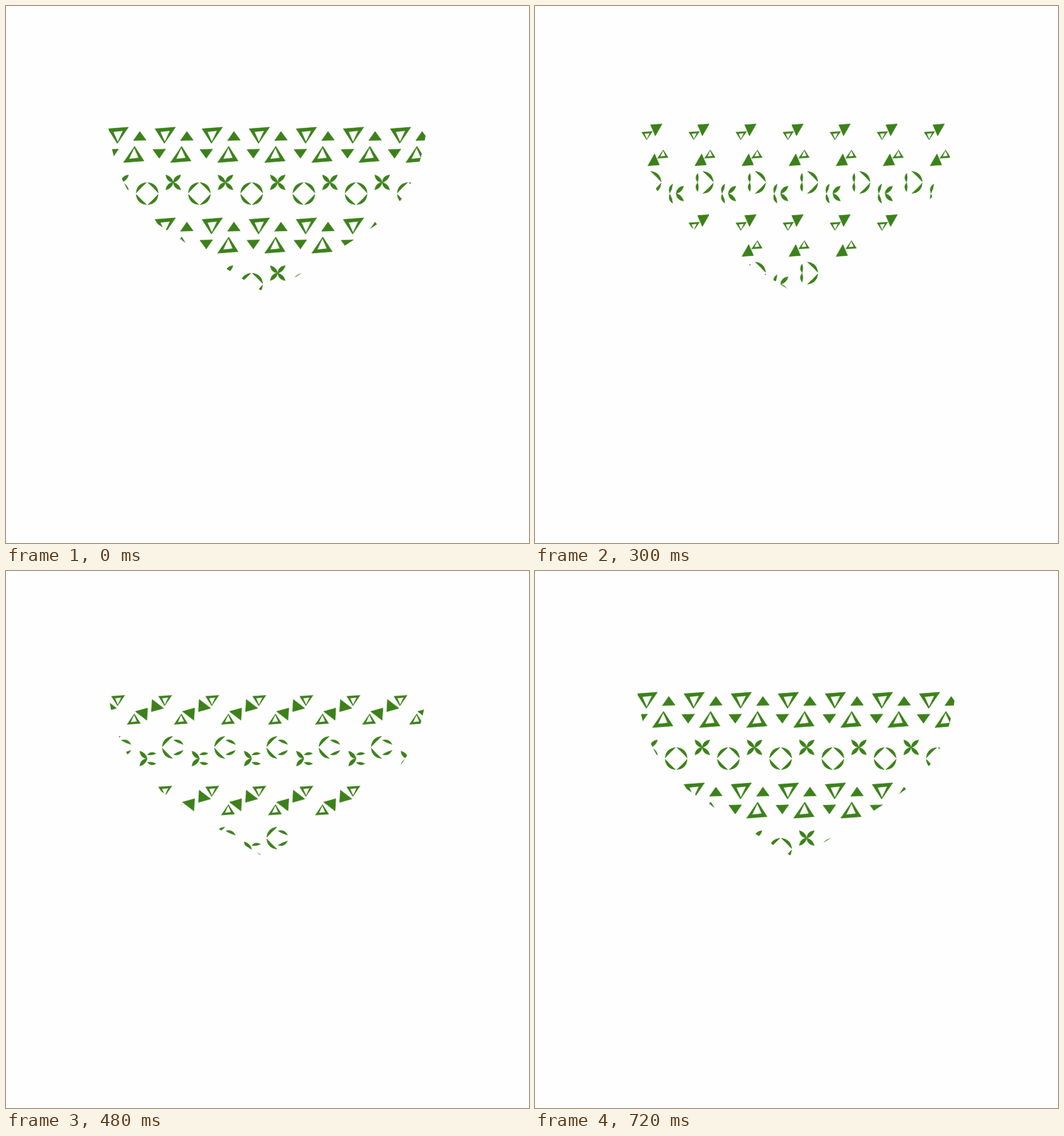
An HTML page with a canvas for the animation above (0.75 s loop, 739 by 758 pixels).

```html
<!DOCTYPE html>
<html>
<head>
<meta charset="utf-8">
<style>
html, body { margin: 0; width: 100%; height: 100%; overflow: hidden; background: #fefefe; }
canvas { display: block; }
</style>
</head>
<body>
<canvas width="739" height="758"></canvas>
<script>
const ctx = document.querySelector('canvas').getContext('2d');
const CENTER = 369.5, LOOP = 750, STEP = 30;

// Bowl: two curves down the left side, mirrored for the right.
const half = new Path2D('M143.5 160 Q151 255 209 304 Q262 341 369.5 407 V160 Z');
const bowl = new Path2D(half);
bowl.addPath(half, new DOMMatrix([-1, 0, 0, 1, 2 * CENTER, 0]));

// Triangles, relative to the middle of their tile.
const solid = polygon([[10.5, -6], [19.5, -19], [28.5, -6.7]]);
const pivot = [-11.2, -12.5];
const corners = [[-14.3, -10.2], [14.7, -12.4], [-1, 10.5]];
const outline = polygon(corners);
outline.addPath(polygon(corners.map(([x, y]) => [x * .48, y * .7 + 1.1])));

function polygon(points) {
  const path = new Path2D();
  points.forEach(([x, y]) => path.lineTo(x, y));
  path.closePath();
  return path;
}

const ramp = (t, from, to) => Math.min(1, Math.max(0, (t - from) / (to - from)));
const smooth = x => x * x * (3 - 2 * x);
const sharp = x => x * x / (x * x + (1 - x) * (1 - x));
const pulse = (t, from, peak, to) => smooth(t < peak ? ramp(t, from, peak) : 1 - ramp(t, peak, to));

function at(x, y, angle, sx, sy, draw) {
  ctx.save();
  ctx.translate(x, y);
  ctx.rotate(angle);
  ctx.scale(sx, sy);
  draw();
  ctx.restore();
}

function paint(path) {
  ctx.fill(path, 'evenodd');
  ctx.stroke(path);
}

function triangles(x, y, t) {
  const turn = -Math.PI * sharp(ramp(t, 0, 735));
  const grow = 1 + .16 * pulse(t, 250, 370, 720);
  const size = 1 - .49 * pulse(t, 0, 345, 720);
  for (const angle of [0, Math.PI]) {
    at(x, y, angle, 1, 1, () => {
      at(...pivot, 0, size, size, () => paint(outline));
      at(0, 0, turn, grow, grow, () => paint(solid));
    });
  }
}

// A leaf is a petal of the cross when open is 0, a quarter of the ring when it is 1.
function leaf(open) {
  const px = open, py = -15.6 * open;
  const qx = 10.5 + 5.1 * open, qy = -10.5 + 9.5 * open;
  const bulge = k => [(px + qx) / 2 + k * (qy - py), (py + qy) / 2 - k * (qx - px)];
  const path = new Path2D();
  path.moveTo(px, py);
  path.quadraticCurveTo(...bulgeOut(bulge), qx, qy);
  path.quadraticCurveTo(...bulge(.33 * open - .3), px, py);
  path.closePath();
  paint(path);
}

function bulgeOut(bulge) {
  return bulge(.41);
}

function flower(x, y, right, left) {
  for (const flip of [1, -1]) {
    at(x, y, 0, 1, flip, () => {
      leaf(right);
      ctx.rotate(-Math.PI / 2);
      leaf(left);
    });
  }
}

function draw(t) {
  ctx.fillStyle = '#fefefe';
  ctx.fillRect(0, 0, 739, 758);
  ctx.fillStyle = ctx.strokeStyle = '#3c811a';
  ctx.lineWidth = .6;
  ctx.save();
  ctx.clip(bowl);
  const right = smooth(ramp(t, 0, 180)) - smooth(ramp(t, 420, 570));
  const left = sharp(ramp(t, 210, 405)) - smooth(ramp(t, 595, 720));
  for (const dy of [0, 128]) {
    for (let i = 0; i < 7; i++) triangles(169.5 + 66.5 * i, 196 + dy, t);
    for (let i = 0; i < 6; i++) {
      flower(162.6 + 73.8 * i, 249 + dy, right, left);
      flower(199.5 + 73.8 * i, 264.8 + dy, 1 - right, 1 - left);
    }
  }
  ctx.restore();
}

function tick() {
  draw(Math.floor(performance.now() % LOOP / STEP) * STEP);
  requestAnimationFrame(tick);
}
tick();
</script>
</body>
</html>
```
